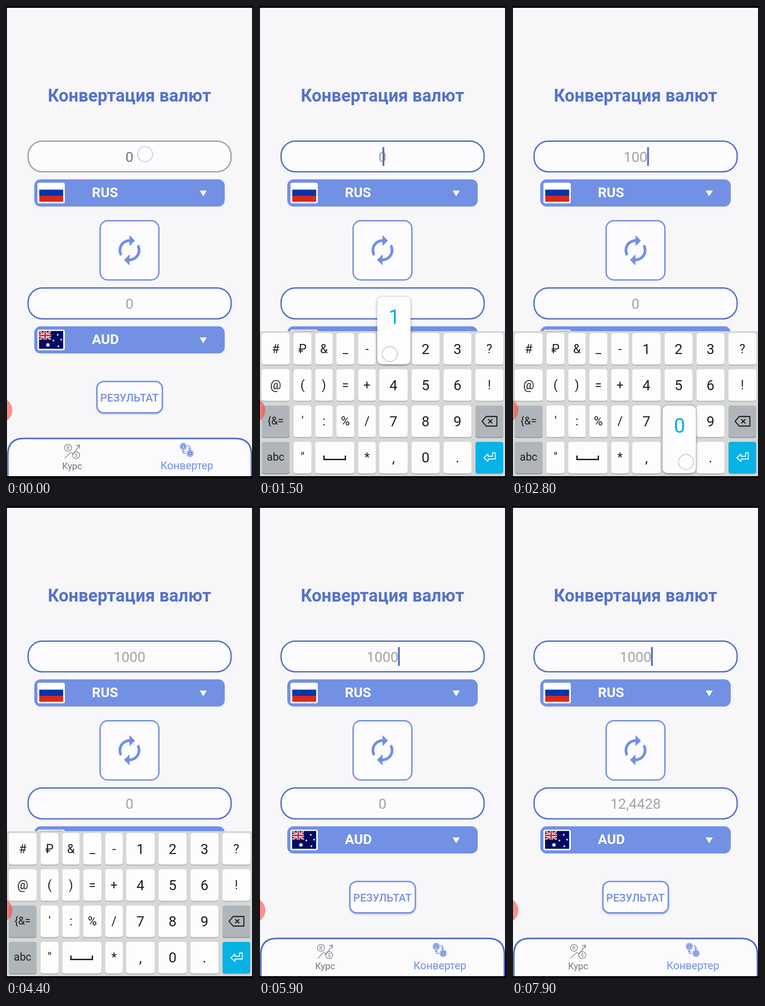
Recreate the animation shown at these times as an HTML page. Size 542 by 1032 pixels, loop 8000 ms.

```html
<!DOCTYPE html>
<html lang="ru">
<head>
<meta charset="utf-8">
<title>Конвертация валют</title>
<style>
  html, body { margin: 0; width: 100%; height: 100%; overflow: hidden; background: #000; }
  svg { display: block; }
  text { font-family: Roboto, "Noto Sans", sans-serif; text-anchor: middle; }
  .field { fill: #fcfbfe; stroke: #5471c5; stroke-width: 3; }
  .field.pressed { stroke: #a5a4a7; }
  .value { font-size: 31px; fill: #a3a2a6; }
  .value.pressed { fill: #767579; }
  .box { fill: #fcfbfe; stroke: #7290e4; stroke-width: 3; }
  .code { font-size: 30px; font-weight: 700; fill: #fff; text-anchor: start; }
  .title { font-size: 38px; font-weight: 700; fill: #5572c9; }
  .action { font-size: 23.5px; font-weight: 500; fill: #7290e4; }
  .raised { filter: drop-shadow(0 2px 1.5px rgba(0, 0, 0, .22)); }
  .popup { filter: drop-shadow(0 1px 3px rgba(0, 0, 0, .4)); }
  .line { fill: none; stroke-width: 1.3; }
</style>
</head>
<body>
<svg id="stage" width="542" height="1032" viewBox="0 0 542 1032">
  <defs>
    <g id="select">
      <rect x="62" y="379" width="418" height="59.5" rx="14" fill="#7290e4"/>
      <path d="M425 403.5h15.5l-7.75 12.5z" fill="#fff"/>
      <rect x="69" y="386.5" width="60" height="45" rx="4" fill="#fff"/>
    </g>
    <clipPath id="canton"><rect x="73" y="710.5" width="26" height="19.5"/></clipPath>
  </defs>

  <rect width="542" height="1032" fill="#000"/>
  <rect x="2" y="4" width="538" height="1024" fill="#f7f6f9"/>
  <text class="title" x="271" y="209">Конвертация валют</text>

  <rect id="amountBox" class="field" x="48.5" y="295.5" width="445.5" height="67" rx="31"/>
  <text id="amount" class="value" x="271" y="341">0</text>
  <rect id="caret" y="308.5" width="4" height="41" fill="#5471c5"/>

  <use href="#select"/>
  <rect x="73" y="401.5" width="52.5" height="13.5" fill="#0434a8"/>
  <rect x="73" y="415" width="52.5" height="13" fill="#d9291c"/>
  <text class="code" x="188.5" y="418">RUS</text>

  <rect class="box" x="206.5" y="469.5" width="129" height="129.5" rx="17"/>
  <path transform="translate(235 498) scale(3)" fill="#7290e4" d="M12 6v3l4-4-4-4v3c-4.42 0-8 3.58-8 8 0 1.57.46 3.03 1.24 4.26L6.7 14.8c-.45-.83-.7-1.79-.7-2.8 0-3.31 2.69-6 6-6zm6.76 1.74L17.3 9.2c.44.84.7 1.79.7 2.8 0 3.31-2.69 6-6 6v-3l-4 4 4 4v-3c4.42 0 8-3.58 8-8 0-1.57-.46-3.03-1.24-4.26z"/>

  <rect class="field" x="48.5" y="616.5" width="445.5" height="67.5" rx="31"/>
  <text id="result" class="value" x="271" y="662">0</text>

  <use href="#select" y="321.3"/>
  <rect x="72.5" y="710.5" width="53" height="39" fill="#020a63"/>
  <g clip-path="url(#canton)" fill="none">
    <path d="M73 710.5l26 19.5M99 710.5l-26 19.5" stroke="#fff" stroke-width="4"/>
    <path d="M73 710.5l26 19.5M99 710.5l-26 19.5" stroke="#d8283a" stroke-width="1.5"/>
    <path d="M86 710v20M73 720.2h26" stroke="#fff" stroke-width="6.5"/>
    <path d="M86 710v20M73 720.2h26" stroke="#d8283a" stroke-width="3.6"/>
  </g>
  <g id="stars" fill="#fff"></g>
  <text class="code" x="188.5" y="739">AUD</text>

  <rect class="box raised" x="199.5" y="821" width="143.5" height="68.5" rx="15"/>
  <rect id="ripple" x="201" y="822.5" width="140.5" height="65.5" rx="14" fill="#566"/>
  <text class="action" x="271" y="864.5">РЕЗУЛЬТАТ</text>

  <path d="M4 1030V981Q4 945.5 39 945.5H503Q538.5 945.5 538.5 981V1030" fill="#fbfafd" stroke="#5471c5" stroke-width="3.5"/>
  <g class="line" stroke="#77767a">
    <circle cx="136" cy="966" r="7.7"/>
    <circle cx="154" cy="982" r="7.7"/>
    <path d="M129 989l13-13 5 4 14-19M154 961l7.5-1-1 7.5"/>
  </g>
  <g font-size="11" fill="#77767a">
    <text x="136" y="970">B</text><text x="154" y="986">$</text>
    <text x="145" y="1013" font-size="20.3">Курс</text>
  </g>
  <g class="line" stroke="#6584dc">
    <circle cx="389" cy="963" r="7"/><circle cx="404" cy="978" r="7"/>
    <circle cx="389" cy="963" r="4.6" fill="#6584dc"/><circle cx="404" cy="978" r="4.6" fill="#6584dc"/>
    <path d="M398 962h5v6M400 966l3 3 3-3M395 978h-6v-5M386 975l3-3 3 3"/>
  </g>
  <g font-size="8" font-weight="700" fill="#fff">
    <text x="389" y="966">$</text><text x="404" y="981">€</text>
  </g>
  <text x="397" y="1012.5" font-size="23.5" fill="#7290e4">Конвертер</text>

  <g id="keyboard">
    <rect x="2" y="711" width="538" height="330" fill="#d5d8d6"/>
    <g id="keys"></g>
    <path d="M142.500 983v8.500h47v-8.500" fill="none" stroke="#1d1f21" stroke-width="3"/>
    <g fill="none" stroke="#1d1f21" stroke-width="2.300" stroke-linejoin="round">
      <path d="M489.500 908l9-10.500h23.500v21h-23.500zM503 903.500l9 9M512 903.500l-9 9"/>
    </g>
    <path d="M493.500 988l9-8.500v5h10v-7.500h6v13.500h-16v5.500z" fill="none" stroke="#fff" stroke-width="1.800" stroke-linejoin="round"/>
    <rect id="enterShade" x="475" y="953" width="61" height="69" rx="5" opacity=".2"/>
  </g>

  <g id="popup">
    <rect class="popup" width="73" height="147" rx="10" fill="#fdfdfe"/>
    <text id="popupText" x="37" y="59" font-size="44" fill="#06aedb"></text>
  </g>
  <circle cx="-13" cy="884" r="27" fill="rgba(250,66,52,.56)"/>
  <circle id="touch" r="16.500" fill="rgba(255,255,255,.55)" stroke="#c3cbdf" stroke-width="2"/>
  <path d="M0 0H542V1032H0ZM2 4V1028H540V4Z" fill="#000" fill-rule="evenodd"/>
</svg>

<script>
const LOOP = 8000, STEP = 100;
const el = id => document.getElementById(id);
const show = (node, on) => node.setAttribute('visibility', on ? 'visible' : 'hidden');

function add(parent, tag, attrs, text) {
  const node = document.createElementNS('http://www.w3.org/2000/svg', tag);
  for (const name in attrs) node.setAttribute(name, attrs[name]);
  if (text) node.textContent = text;
  return parent.appendChild(node);
}

function star(x, y, r) {
  const points = [];
  for (let i = 0; i < 14; i++) {
    const a = i * Math.PI / 7, d = i % 2 ? r * 0.45 : r;
    points.push(x + d * Math.sin(a), y - d * Math.cos(a));
  }
  add(el('stars'), 'polygon', { points: points.join(' ') });
}
star(92, 741, 5.8);
for (const [x, y] of [[104, 731.5], [113.5, 719], [121, 729.5], [115, 744]]) star(x, y, 2.8);

// Column edges and key rows; the space bar spans two columns.
const cols = [[6, 67], [76, 115], [123.5, 161.5], [170, 209], [218, 256], [264, 326], [335, 396], [405, 466], [475, 536]];
const rows = [
  ['#', '₽', '&', '_', '-', '1', '2', '3', '?'],
  ['@', '(', ')', '=', '+', '4', '5', '6', '!'],
  ['{&=', "'", ':', '%', '/', '7', '8', '9', 'back'],
  ['abc', '"', 'space', '', '*', ',', '0', '.', 'enter']
];
const spots = {};
rows.forEach((row, r) => row.forEach((key, c) => {
  if (!key) return;
  const [x, edge] = cols[c], y = 715 + r * 79.3;
  const w = (key === 'space' ? cols[c + 1][1] : edge) - x;
  const dark = ['{&=', 'abc', 'back'].includes(key);
  const fill = key === 'enter' ? '#06b3e4' : dark ? '#b0b5b9' : '#fdfdfe';
  add(el('keys'), 'rect', { x, y: y + 2, width: w, height: 69, rx: 5, fill: dark ? '#8f9497' : '#adb0b0' });
  add(el('keys'), 'rect', { x, y, width: w, height: 69, rx: 5, fill });
  spots[key] = { x: x - 4.5, y: y - 79 };
  if (['space', 'back', 'enter'].includes(key)) return;
  const digit = /[\d.,]/.test(key), wide = key.length > 1;
  add(el('keys'), 'text', {
    x: x + w / 2, y: y + (digit ? 45.5 : wide ? 41.5 : 43.5),
    'font-size': digit ? 31 : wide ? 23.5 : 27, fill: '#1d1f21'
  }, key);
}));

const taps = [
  { down: -100, up: 100, x: 305, y: 324 },
  { down: 1500, up: 1700, x: 287, y: 761, key: '1' },
  { down: 2100, up: 2300, x: 382, y: 997, key: '0' },
  { down: 2400, up: 2600, x: 382, y: 997, key: '0' },
  { down: 2700, up: 2900, x: 382, y: 997, key: '0' },
  { down: 4600, up: 4700, x: 506, y: 990 },
  { down: 6600, up: 6700, x: 271, y: 858 }
];

// Keyboard offset and opacity from each time on.
const slide = [[0, 320, 0], [600, 81, .32], [700, 0, 1], [4700, 16, .9], [4800, 81, .4], [4900, 160, .1], [5000, 320, 0]];

function render(t) {
  const tap = taps.findLast(p => p.down <= t);
  const held = t < tap.up;
  const fade = held ? 1 : Math.max(0, 0.7 - (t - tap.up) / STEP * 0.35);
  el('touch').setAttribute('transform', `translate(${tap.x} ${tap.y})`);
  el('touch').setAttribute('opacity', fade);

  const popped = held && tap.key;
  show(el('popup'), popped);
  if (popped) {
    const { x, y } = spots[tap.key];
    el('popup').setAttribute('transform', `translate(${x} ${y})`);
    el('popupText').textContent = tap.key;
  }

  const typed = taps.filter(p => p.key && p.up <= t).map(p => p.key).join('');
  el('amount').textContent = typed || '0';
  el('amount').classList.toggle('pressed', t < 100);
  el('amountBox').classList.toggle('pressed', t < 100);

  // Each key press restarts the caret blink.
  const reset = taps.findLast((p, i) => (p.key || i === 0) && p.up <= t);
  show(el('caret'), reset && Math.floor((t - reset.up) / 500) % 2 === 0);
  el('caret').setAttribute('x', 271 + typed.length * 8.5);

  const [, dy, alpha] = slide.findLast(s => s[0] <= t);
  el('keyboard').setAttribute('transform', `translate(0 ${dy})`);
  el('keyboard').setAttribute('opacity', alpha);
  show(el('enterShade'), t >= 4600 && t < 4700);

  el('ripple').setAttribute('opacity', t >= 6600 && t < 6900 ? fade * 0.14 : 0);
  el('result').textContent = t < 7500 ? '0' : '12,4428';
}

const start = performance.now();
function tick() {
  const t = Math.max(0, performance.now() - start) % LOOP;
  render(Math.floor(t / STEP) * STEP);
  requestAnimationFrame(tick);
}
tick();
</script>
</body>
</html>
```
